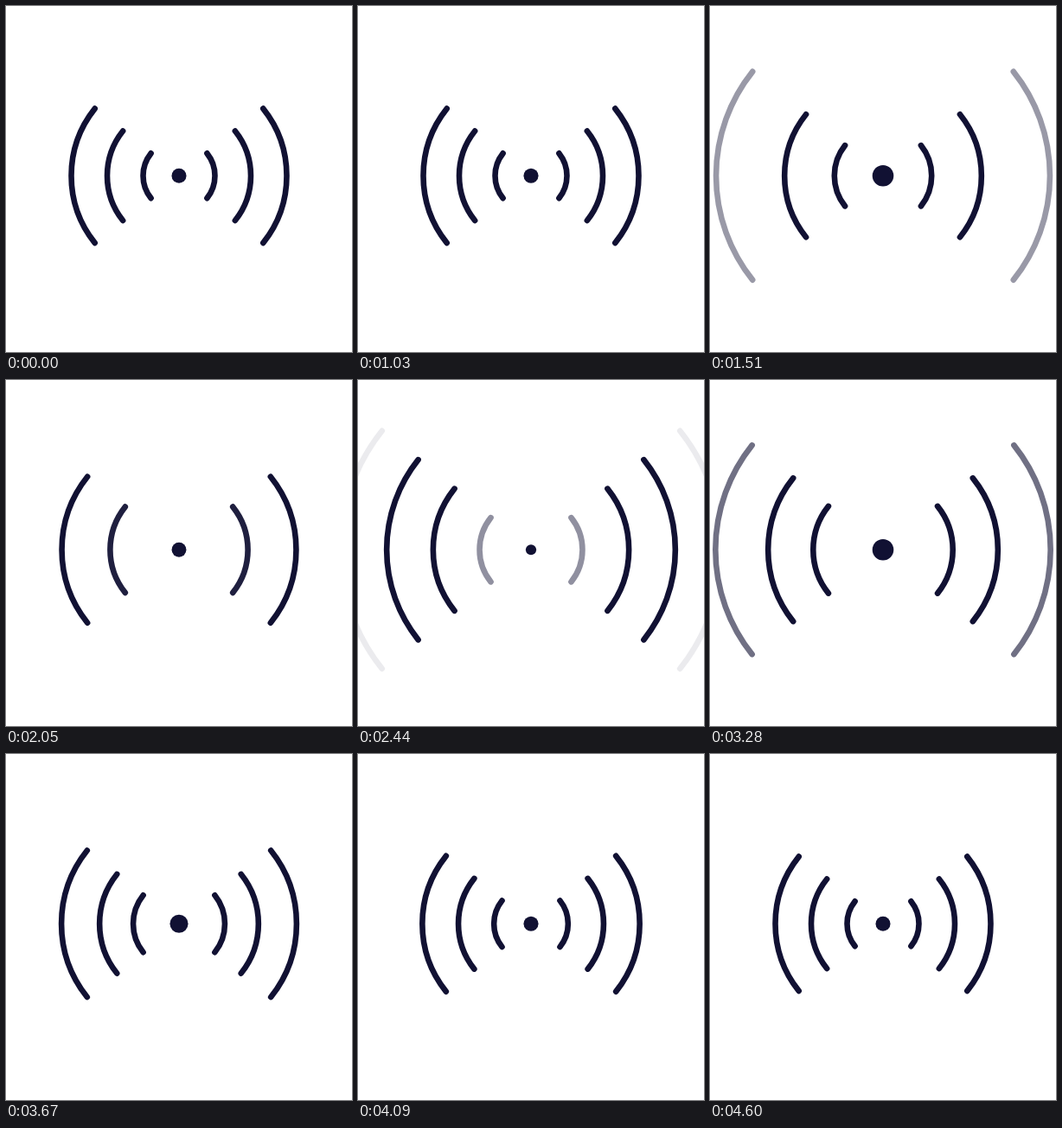
Recreate the animation shown at these times as an HTML page with a canvas. Size 400x400 px, loop 4630 ms.

```html
<!DOCTYPE html>
<html lang="en">
<head>
<meta charset="utf-8">
<title>Signal pulse</title>
<style>
  html, body { margin: 0; height: 100%; overflow: hidden; background: #fff; }
  canvas { display: block; }
</style>
</head>
<body>
<canvas id="stage" width="400" height="400"></canvas>
<script>
const ctx = document.getElementById('stage').getContext('2d');
const LOOP = 4630, STEP = 30, CX = 200, CY = 196.25;
const SPREAD = 38.6 * Math.PI / 180;
const REST = [124.5, 83, 41.5];           // outer, middle, inner
const EXIT_START = [1080, 1180, 1263], EXIT_TIME = [550, 861, 1200];
const END_RADIUS = 226, EXIT_FADE = 280;
const SPEED = 0.2237, BIRTH_RADIUS = 40, FADE_IN = 188;
const FIRST_WAVE = 1873, WAVE_GAP = 240, PASSING_WAVES = 4;
const PEAK = [139.4, 93.5, 54], SETTLED = 4240;
const DOT_KEYS = [[1000, 8.5], [1540, 12.3], [2420, 6.1], [3240, 12.3], [4140, 8.5]];

const clamp = x => Math.max(0, Math.min(1, x));
const ease = x => (1 - Math.cos(Math.PI * clamp(x))) / 2;
const mix = (a, b, k) => a + (b - a) * k;

function arcs(radius, alpha) {
  if (alpha <= 0) return;
  ctx.globalAlpha = clamp(alpha);
  for (const middle of [0, Math.PI]) {
    ctx.beginPath();
    ctx.arc(CX, CY, radius, middle - SPREAD, middle + SPREAD);
    ctx.stroke();
  }
}

function dotRadius(t) {
  let r = DOT_KEYS[0][1];
  for (let i = 1; i < DOT_KEYS.length; i++) {
    const [t0, r0] = DOT_KEYS[i - 1], [t1, r1] = DOT_KEYS[i];
    if (t >= t0) r = mix(r0, r1, ease((t - t0) / (t1 - t0)));
  }
  return r;
}

// Travels outward, brakes to a peak, then eases back to its resting radius.
function settlingRadius(i, birth, t) {
  const peakTime = 3400 + 70 * i;
  const brake = 2 * (peakTime - birth - (PEAK[i] - BIRTH_RADIUS) / SPEED);
  const left = peakTime - t;
  if (left > brake) return BIRTH_RADIUS + SPEED * (t - birth);
  if (left > 0) return PEAK[i] - SPEED * left * left / (2 * brake);
  return mix(PEAK[i], REST[i], ease(-left / (SETTLED - peakTime)));
}

function draw(t) {
  ctx.globalAlpha = 1;
  ctx.fillStyle = '#fff';
  ctx.fillRect(0, 0, 400, 400);
  ctx.fillStyle = ctx.strokeStyle = '#111133';
  ctx.lineWidth = 6.6;
  ctx.lineCap = 'round';

  ctx.beginPath();
  ctx.arc(CX, CY, dotRadius(t), 0, 2 * Math.PI);
  ctx.fill();

  REST.forEach((rest, i) => {
    const age = t - EXIT_START[i];
    const progress = clamp(age / EXIT_TIME[i]) ** 1.6;
    arcs(mix(rest, END_RADIUS, progress), (EXIT_TIME[i] - age) / EXIT_FADE);
  });

  for (let n = 0; n < PASSING_WAVES + 3; n++) {
    const birth = FIRST_WAVE + WAVE_GAP * n, age = t - birth;
    if (age <= 0) break;
    const i = n - PASSING_WAVES;
    const radius = i < 0 ? BIRTH_RADIUS + SPEED * age : settlingRadius(i, birth, t);
    arcs(radius, Math.min(age / FADE_IN, (END_RADIUS - radius) / 54));
  }
}

function frame() {
  const t = performance.now() % LOOP;
  draw(Math.floor((t - 10) / STEP) * STEP + 10);
  requestAnimationFrame(frame);
}
frame();
</script>
</body>
</html>
```
